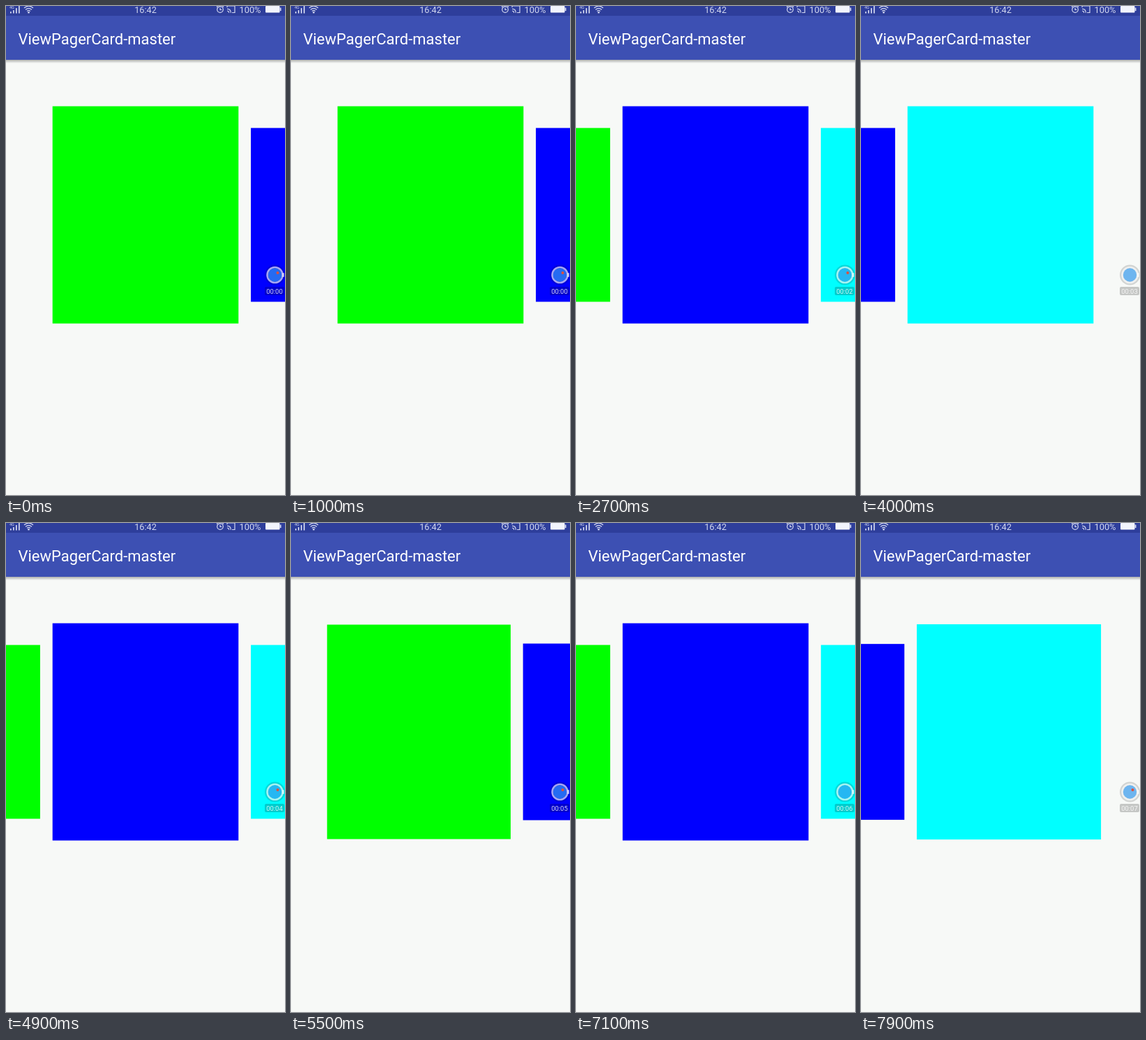
Animation, 400 px wide and 700 px high, one loop 8 s. Source, as an HTML page:

```html
<!DOCTYPE html>
<html lang="en">
<head>
<meta charset="utf-8">
<title>ViewPagerCard</title>
<style>
  html, body { margin: 0; width: 100%; height: 100%; overflow: hidden; background: #f7f9f7; }
  svg { display: block; width: 100vw; height: 100vh; }
  text { font-family: Roboto, "Noto Sans", sans-serif; }
</style>
</head>
<body>
<svg viewBox="0 0 400 700">
  <defs>
    <linearGradient id="shade" x1="0" y1="0" x2="0" y2="1">
      <stop offset="0" stop-color="#000" stop-opacity=".3"/>
      <stop offset="1" stop-color="#000" stop-opacity="0"/>
    </linearGradient>
  </defs>
  <rect width="400" height="700" fill="#f7f9f7"/>
  <g id="cards"></g>

  <g id="recorder">
    <circle cx="385.5" cy="385" r="14.5" fill="#000" fill-opacity=".15"/>
    <circle cx="385.5" cy="385" r="11" fill="none" stroke="#fff" stroke-opacity=".65" stroke-width="2.6"/>
    <circle cx="385.5" cy="385" r="9.7" fill="#39a5ff" fill-opacity=".65"/>
    <rect x="396" y="382" width="3" height="6" rx="1" fill="#fff" fill-opacity=".6"/>
    <circle id="dot" cx="389.5" cy="382" r="2" fill="#e0503c"/>
    <rect x="371" y="402" width="28" height="12" rx="2" fill="#000" fill-opacity=".2"/>
    <text id="timer" x="385" y="411.5" font-size="9.4" text-anchor="middle" fill="#fff" fill-opacity=".85"></text>
  </g>

  <rect y="77" width="400" height="5" fill="url(#shade)"/>
  <rect width="400" height="77" fill="#3d50b3"/>
  <rect width="400" height="14" fill="#2e3e9b"/>
  <text x="17.5" y="55" font-size="22" fill="#fff">ViewPagerCard-master</text>

  <g fill="#d3d8f0">
    <text x="5" y="4" font-size="5.5">4G</text>
    <path d="M6 8h1.7v2.5H6zM10 6h1.7v4.5H10zM14 3h1.7v7.5H14zM18 0h1.7v10.5H18z"/>
    <circle cx="32.5" cy="9.3" r="1.3"/>
    <text x="200" y="10" font-size="12.7" text-anchor="middle">16:42</text>
    <text x="334.5" y="9.5" font-size="12.8">100%</text>
    <rect x="372" y="0" width="20.5" height="9.5" rx="1" fill="#f2f4fc"/>
    <rect x="392.5" y="2.5" width="2" height="4.5"/>
  </g>
  <g fill="none" stroke="#d3d8f0" stroke-width="1.2">
    <path d="M26 2.8Q32.5 -2.6 39 2.8M28 5.2Q32.5 1.4 37 5.2M30 7.4Q32.5 5.4 35 7.4"/>
    <circle cx="307" cy="5" r="4.3"/>
    <path d="M307 2.5V5.3H309.2M302 1.5L304 -.5M312 1.5L310 -.5"/>
    <path d="M317 2V0H328V9.5H324M317 4.2Q322.3 4.2 322.3 9.7M317 7Q319.6 7 319.6 9.7"/>
  </g>
</svg>
<script>
const NS = "http://www.w3.org/2000/svg";
const LOOP = 8000, STEP = 100, BLINK = 2400;
const CARD_W = 266.6, CARD_H = 311, PITCH = 257.7, MID_X = 200, MID_Y = 299;

// start, duration, from page, to page
const swipes = [
  [1100, 1470, 0, 1],
  [2950, 950, 1, 2],
  [4100, 780, 2, 1],
  [5000, 700, 1, 0],
  [5850, 1320, 0, 1],
  [7200, 941, 1, 2]
];

const cards = ["#0f0", "#00f", "#0ff"].map(color => {
  const rect = document.createElementNS(NS, "rect");
  rect.setAttribute("fill", color);
  return document.getElementById("cards").appendChild(rect);
});
const dot = document.getElementById("dot");
const timer = document.getElementById("timer");

// finger drag, then the pager settles
function swipe(u) {
  if (u < 0.4) return 0.4 * (u / 0.4) ** 1.5;
  return 1 - 0.6 * (1 - (u - 0.4) / 0.6) ** 3;
}

function pageAt(t) {
  let page = 0;
  for (const [start, length, from, to] of swipes) {
    if (t < start) break;
    page = from + (to - from) * swipe(Math.min(1, (t - start) / length));
  }
  return page;
}

function draw(t) {
  const page = pageAt(t);
  cards.forEach((rect, i) => {
    const offset = i - page;
    const scale = 1 - 0.2 * Math.min(1, Math.abs(offset));
    const w = CARD_W * scale, h = CARD_H * scale;
    rect.setAttribute("x", MID_X + offset * PITCH - w / 2);
    rect.setAttribute("y", MID_Y - h / 2);
    rect.setAttribute("width", w);
    rect.setAttribute("height", h);
  });
  dot.setAttribute("opacity", t % BLINK < BLINK / 2 ? 1 : 0);
  timer.textContent = "00:0" + Math.max(0, Math.floor((t - 200) / 1000));
}

const begin = performance.now();
function tick() {
  const t = (performance.now() - begin) % LOOP;
  draw(Math.floor(t / STEP) * STEP);
  requestAnimationFrame(tick);
}
tick();
</script>
</body>
</html>
```
